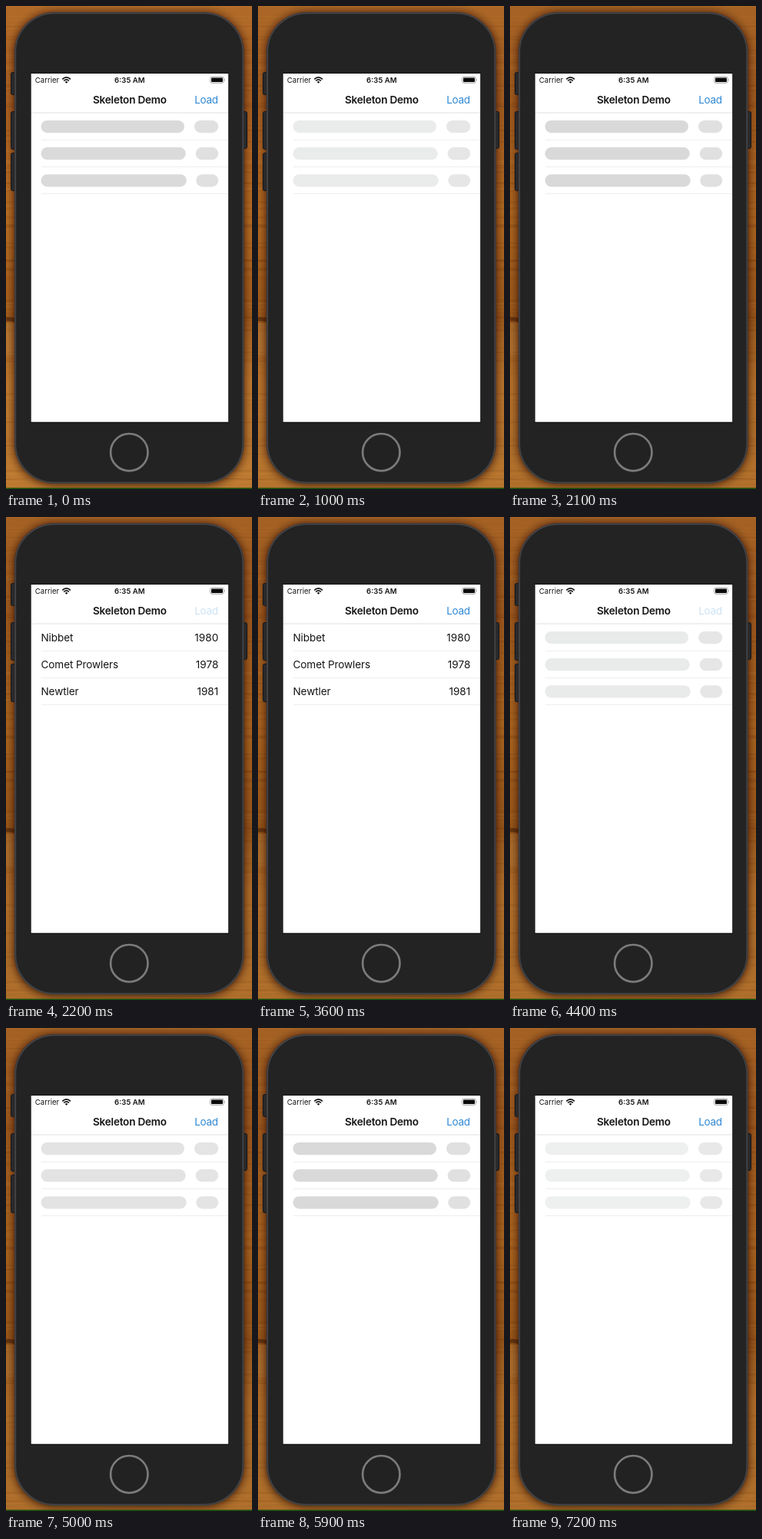
Write an HTML page that moves like this. It is 320 px wide and 629 px high and loops after 7.3 s.

```html
<!DOCTYPE html>
<html lang="en">
<head>
<meta charset="utf-8">
<title>Skeleton Demo</title>
<style>
html, body { margin: 0; width: 100%; height: 100%; overflow: hidden; background: #9a5515; }
svg { display: block; width: 320px; height: 629px; }
text { font-family: Inter, "Liberation Sans", sans-serif; font-size: 13.6px; fill: #151515; }
.status { font-size: 9.6px; }
.bold { font-weight: 600; }
.title, .load { letter-spacing: -.3px; }
.title { letter-spacing: -.24px; }
.name { letter-spacing: -.12px; }
.end { text-anchor: end; }
.mid { text-anchor: middle; }
.load { fill: #2f88d4; }
</style>
</head>
<body>
<svg viewBox="0 0 320 629">
  <defs>
    <linearGradient id="wood" x1="0" y1="0" x2="0" y2="1">
      <stop offset="0" stop-color="#b36c2a"/>
      <stop offset=".2" stop-color="#ad6222"/>
      <stop offset=".45" stop-color="#bb6f24"/>
      <stop offset=".64" stop-color="#a55e1d"/>
      <stop offset=".68" stop-color="#b06a26"/>
      <stop offset=".78" stop-color="#c47c30"/>
      <stop offset="1" stop-color="#bd7a32"/>
    </linearGradient>
    <filter id="soft" x="-20%" y="-10%" width="140%" height="120%">
      <feGaussianBlur stdDeviation="6"/>
    </filter>
  </defs>
  <rect width="320" height="629" fill="url(#wood)"/>
  <g id="grain" fill="none"></g>
  <path d="M0 413H14V455H0Z" fill="#c98a44" opacity=".45"/>
  <path d="M0 408Q6 407 14 410" stroke="#4c260b" stroke-width="5" fill="none" opacity=".65"/>
  <rect id="shade" width="320" height="629" fill="#4a2004"/>
  <rect x="11" y="9" width="298.500" height="614" rx="52" fill="#1c0a00" opacity=".85" filter="url(#soft)"/>
  <rect y="627.500" width="320" height="1.500" fill="#12500c"/>

  <g fill="#29292b" stroke="#17171a">
    <rect x="6.500" y="86.500" width="7" height="29" rx="2"/>
    <rect x="6.500" y="137.500" width="7" height="49" rx="2"/>
    <rect x="6.500" y="191.500" width="7" height="49" rx="2"/>
    <rect x="306.500" y="137.500" width="7" height="48" rx="2"/>
  </g>
  <rect x="11" y="8" width="298.500" height="614" rx="52" fill="#39383a"/>
  <rect x="12.500" y="9.500" width="295.500" height="611" rx="50.500" fill="#232323" stroke="#464548" stroke-width="1.300"/>
  <circle cx="160.300" cy="581.200" r="24.200" fill="#222" stroke="#7b7b7b" stroke-width="2.700"/>
  <rect x="32" y="87" width="258" height="456" fill="#101010"/>
  <rect x="32.700" y="88" width="256.500" height="453.700" fill="#fff"/>

  <text class="status" x="37.800" y="100">Carrier</text>
  <g fill="none" stroke="#111" stroke-width="1.700">
    <path d="M73.300 95.300Q78.600 90.300 83.900 95.300M75.200 97.500Q78.600 94.300 82 97.500"/>
  </g>
  <path d="M76.800 98.900Q78.600 97.300 80.400 98.900L78.600 100.700Z" fill="#111"/>
  <text class="status bold mid" x="160.800" y="100">6:35 AM</text>
  <rect x="265.700" y="92.300" width="17.600" height="8" rx="2.200" fill="#fff" stroke="#8c8c8c" stroke-width=".8"/>
  <rect x="267" y="93.500" width="15" height="5.600" rx="1" fill="#0a0a0a"/>
  <path d="M284.300 95Q285.700 96.300 284.300 97.600Z" fill="#8c8c8c"/>

  <text class="title bold mid" x="160.900" y="126.500">Skeleton Demo</text>
  <text class="load end" id="load" x="275.900" y="126.500">Load</text>
  <path d="M33 139H289" stroke="#e0e0e0"/>
  <path d="M46 174.500H289M46 209.500H289M46 244.500H289" stroke="#eee"/>
  <g id="content"></g>
  <g id="bars"><g id="wide"></g><g id="small"></g></g>
</svg>
<script>
const LOOP = 7300, SHOW = 2200, HIDE = 4400;
const $ = id => document.getElementById(id);
const clamp = v => Math.max(0, Math.min(1, v));
const ease = v => (1 - Math.cos(Math.PI * clamp(v))) / 2;
const mix = (a, b, k) => `rgb(${a.map((v, i) => Math.round(v + (b[i] - v) * k))})`;

function add(parent, tag, attrs, label = '') {
  const el = document.createElementNS('http://www.w3.org/2000/svg', tag);
  for (const key in attrs) el.setAttribute(key, attrs[key]);
  el.textContent = label;
  $(parent).append(el);
}

let seed = 41;
const random = () => (seed = seed * 16807 % 2147483647) / 2147483647;
for (let i = 0; i < 120; i++) {
  const y = random() * 629, bend = random() * 10 - 5;
  add('grain', 'path', {
    d: `M0 ${y.toFixed(1)}q80 ${bend.toFixed(1)} 160 0t160 0`,
    stroke: random() < .6 ? '#7a4012' : '#d28c3c',
    'stroke-width': (.6 + random() * 2.4).toFixed(1),
    opacity: (.08 + random() * .16).toFixed(2)
  });
}

const rows = [
  { name: 'Nibbet', year: 1980, right: 232, left: 245 },
  { name: 'Comet Prowlers', year: 1978, right: 233.8, left: 246.7 },
  { name: 'Newtler', year: 1981, right: 234.8, left: 247.3 }
];
rows.forEach((row, i) => {
  const y = 149 + 35.1 * i;
  const bar = (parent, x, end) =>
    add(parent, 'rect', { x, y, width: end - x, height: 16.2, rx: 8.1 });
  bar('wide', 45.5, row.right);
  bar('small', row.left, 276.2);
  add('content', 'text', { class: 'name', x: 45.5, y: y + 12.8 }, row.name);
  add('content', 'text', { class: 'end', x: 276.3, y: y + 12.8 }, row.year);
});

// 0 is the pale end of the pulse, 1 the dark end
function pulse(t) {
  if (t < SHOW) return (1 + Math.cos(Math.PI * (t - 2100) / 1000)) / 2 * .8 + .18;
  if (t < 7000) return .25 + .75 * ease((t - HIDE) / 1400);
  return 1 - ease((t - 7000) / 200);
}

function loadAlpha(t) {
  const tap = [6200, HIDE, SHOW].find(start => t >= start);
  return tap === undefined ? 1 : .24 + .76 * ease((t - tap - 100) / 500);
}

function draw(t) {
  const loaded = t >= SHOW && t < HIDE;
  $('content').style.display = loaded ? '' : 'none';
  $('bars').style.display = loaded ? 'none' : '';
  const k = pulse(t);
  $('wide').setAttribute('fill', mix([238, 239, 239], [217, 217, 217], k));
  $('small').setAttribute('fill', mix([232, 232, 232], [224, 224, 224], k));
  $('load').setAttribute('opacity', loadAlpha(t));
  $('shade').setAttribute('opacity', .02 + .12 * clamp(t / SHOW));
}

const start = performance.now();
function frame() {
  const t = (performance.now() - start) % LOOP;
  draw(Math.floor(t / 100) * 100);
  requestAnimationFrame(frame);
}
draw(0);
requestAnimationFrame(frame);
</script>
</body>
</html>
```
